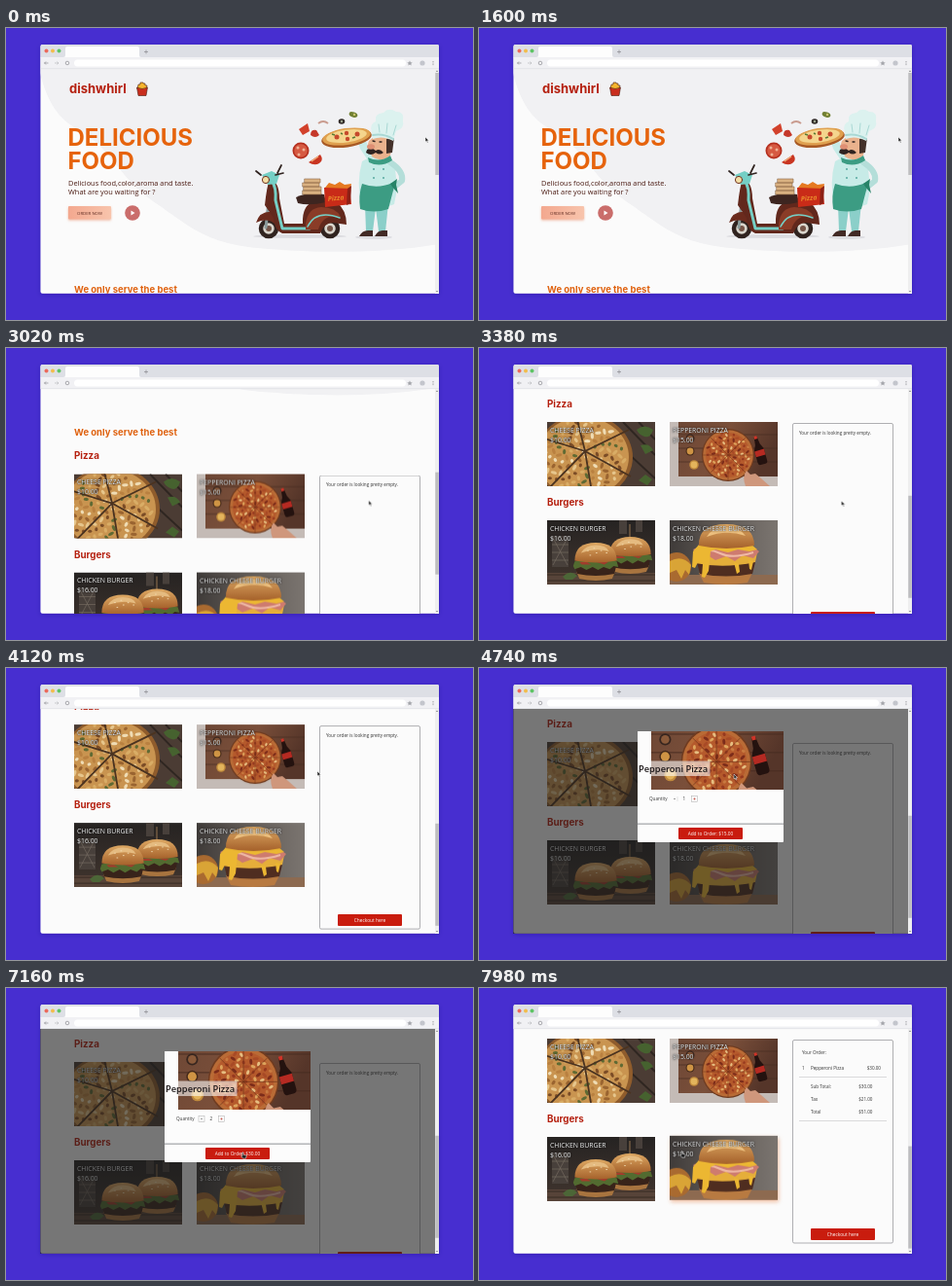
Write an HTML page that moves like this. It is 480x300 px and loops after 8000 ms.

```html
<!DOCTYPE html>
<html lang="en">
<head>
<meta charset="utf-8">
<title>Food order</title>
<style>
@property --scroll { syntax: "<number>"; inherits: true; initial-value: 0; }
html, body { margin: 0; width: 100%; height: 100%; overflow: hidden; background: #472ed0; }
svg.stage { display: block; width: 100vw; height: 100vh; animation: scroll 8s linear infinite; }
text { font-family: "Open Sans", sans-serif; }
.display, .display text { font-family: Inter, sans-serif; font-weight: 700; }
.page { transform: translateY(calc(var(--scroll) * -1px)); }
.thumb { transform: translateY(calc(var(--scroll) * .45px)); }
.name { font-size: 6.9px; fill: #fff; filter: drop-shadow(.5px .6px .5px #000) drop-shadow(0 0 1px #0009); }
.small { font-size: 4.6px; fill: #333; }
.label { font-size: 4.8px; fill: #fff; text-anchor: middle; }
.end { text-anchor: end; }

.cursor { animation: move 8s ease-in-out infinite; }
.arrow, .hand, .modal, .one, .two, .empty, .order { animation: 8s step-end infinite; }
.hand { animation-name: hand; }
.arrow { animation-name: arrow; }
.modal { animation-name: modal; }
.one { animation-name: one; }
.two { animation-name: two; }
.empty { animation-name: empty; }
.order { animation-name: order; }
.pick { animation: pick 8s linear infinite; }
.last { animation: last 8s linear infinite; }

@keyframes scroll {
  0%, 30.8% { --scroll: 0; }
  33% { --scroll: 58; }
  36% { --scroll: 138; }
  39% { --scroll: 212; }
  41.5%, 46% { --scroll: 235; }
  49%, 50.5% { --scroll: 259; }
  51.5% { --scroll: 253; }
  53.5%, 93.5% { --scroll: 235; }
  97.5%, 100% { --scroll: 259; }
}
@keyframes move {
  0%, 21% { transform: translate(431px, 112px); }
  29%, 33% { transform: translate(373px, 156px); }
  42%, 48% { transform: translate(372.5px, 157px); }
  51.5% { transform: translate(320px, 106px); }
  55%, 60% { transform: translate(262px, 109px); }
  69%, 77% { transform: translate(221px, 134px); }
  86%, 92% { transform: translate(243px, 169px); }
  97%, 100% { transform: translate(208px, 168px); }
}
@keyframes hand {
  0% { opacity: 0; } 53.5% { opacity: 1; } 57.25% { opacity: 0; }
  68% { opacity: 1; } 79% { opacity: 0; } 84% { opacity: 1; }
  91.25% { opacity: 0; } 95% { opacity: 1; }
}
@keyframes arrow {
  0% { opacity: 1; } 53.5% { opacity: 0; } 57.25% { opacity: 1; }
  68% { opacity: 0; } 79% { opacity: 1; } 84% { opacity: 0; }
  91.25% { opacity: 1; } 95% { opacity: 0; }
}
@keyframes modal { 0% { opacity: 0; } 57.25% { opacity: 1; } 91.25% { opacity: 0; } }
@keyframes one { 0% { opacity: 1; } 73.75% { opacity: 0; } }
@keyframes two { 0% { opacity: 0; } 73.75% { opacity: 1; } }
@keyframes empty { 0% { opacity: 1; } 91.25% { opacity: 0; } }
@keyframes order { 0% { opacity: 0; } 91.25% { opacity: 1; } }
@keyframes pick {
  0%, 53% { transform: none; filter: none; }
  55%, 57% { transform: translateY(-1px); filter: drop-shadow(1px 2px 2px #e9946699); }
  58%, 100% { transform: none; filter: none; }
}
@keyframes last {
  0%, 95% { transform: none; filter: none; }
  97%, 100% { transform: translateY(-1.2px); filter: drop-shadow(1px 2px 2px #e9946699); }
}
</style>
</head>
<body>
<svg class="stage" viewBox="0 0 480 300" preserveAspectRatio="none">
<defs>
  <clipPath id="view"><rect x="35.500" y="42" width="409.500" height="230.700"/></clipPath>
  <filter id="shade" x="-10%" y="-10%" width="120%" height="125%">
    <feDropShadow dx="0" dy="1" stdDeviation="2" flood-color="#1d0c7c" flood-opacity=".35"/>
  </filter>
  <filter id="soft" x="-20%" y="-40%" width="140%" height="200%">
    <feDropShadow dx="0" dy="1.2" stdDeviation="1.3" flood-color="#e47a50" flood-opacity=".5"/>
  </filter>
  <linearGradient id="peach"><stop stop-color="#f3a88f"/><stop offset="1" stop-color="#f8c4ac"/></linearGradient>
  <linearGradient id="night" x2="0" y2="1"><stop stop-color="#262322"/><stop offset="1" stop-color="#41352e"/></linearGradient>
  <linearGradient id="wood" x2="1" y2=".3"><stop stop-color="#6d4735"/><stop offset=".5" stop-color="#7a4f3a"/><stop offset="1" stop-color="#553529"/></linearGradient>
  <linearGradient id="wall"><stop stop-color="#3f3b39"/><stop offset=".35" stop-color="#59534f"/><stop offset="1" stop-color="#7b7570"/></linearGradient>
  <linearGradient id="bun" x2="0" y2="1"><stop stop-color="#dda863"/><stop offset="1" stop-color="#a5612b"/></linearGradient>

  <symbol id="cheese" viewBox="0 0 111 66">
    <rect width="111" height="66" fill="#4b3c34"/>
    <path d="M78 0L111 34M94 0L111 18M70 20L111 58" stroke="#2f2621" stroke-width="2"/>
    <ellipse cx="38" cy="36" rx="50" ry="44" fill="#8f5c2c"/>
    <ellipse cx="37" cy="36" rx="47" ry="41" fill="#c99450"/>
    <g id="bits"></g>
    <path d="M39 30L-6 16M39 30L30 -6M39 30L84 8M39 30L86 56M39 30L46 72M39 30L2 68" stroke="#4b3320" stroke-width="1.800"/>
    <path d="M92 8q8-7 17 0q-3 9-9 7t-8-7M96 24q9-3 13 5l-8 4zM94 60l7-6 7 5-5 6z" fill="#46622f"/>
  </symbol>

  <symbol id="pepperoni" viewBox="0 0 111 66">
    <rect width="111" height="66" fill="#c4bbb6"/>
    <path d="M9 0H111V56H9z" fill="url(#wood)"/>
    <path d="M9 13H111M9 27H111M9 41H111" stroke="#472c21" stroke-width=".7"/>
    <circle cx="21" cy="17" r="4.500" fill="#38261f"/><circle cx="21" cy="17" r="3.200" fill="#8a5a3a"/>
    <circle cx="21" cy="30" r="4.500" fill="#44291a"/><circle cx="21" cy="30" r="3.400" fill="#cf9444"/>
    <circle cx="25" cy="44" r="4.800" fill="#c08a3c"/><circle cx="25" cy="44" r="3.400" fill="#e3b45c"/>
    <circle cx="60" cy="34" r="27" fill="#6f3b20"/>
    <circle cx="60" cy="34" r="25.800" fill="#b96b36"/>
    <circle cx="60" cy="34" r="23" fill="#b55a2c"/>
    <g id="toppings"></g>
    <path d="M60 8V60M34 34H86M42 16L78 52M78 16L42 52" stroke="#6e3218" stroke-width=".5"/>
    <g transform="rotate(-16 92 29)">
      <path d="M90.500 15h3l1 8 2.500 5v13q0 3-2.500 3h-5q-2.500 0-2.500-3V28l2.500-5z" fill="#24120f"/>
      <path d="M87 29h10v6H87z" fill="#b52a22"/><path d="M90.500 14h3v3h-3z" fill="#cf3428"/>
    </g>
    <path d="M78 66q-4-10 1-16l4 4 5-1 6 5 9 8z" fill="#cf977c"/>
  </symbol>

  <symbol id="burger" viewBox="0 0 60 52">
    <path d="M5 40h50l-4 9q-21 5-42 0z" fill="#a8743f"/>
    <path d="M4 34q26-5 52 0l-2 9q-24 5-48 0z" fill="#38231a"/>
    <path d="M3 27q27-7 54 0l2 7-6-1-5 4-8-3-7 4-7-4-8 4-7-4-8 3-2-4z" fill="#526b30"/>
    <path d="M9 28h10l5 3H12zM31 28h15l-5 3z" fill="#a23c2c"/>
    <path d="M3 26Q3 3 30 3t27 23q-27 5-54 0z" fill="url(#bun)"/>
    <path d="M11 16Q17 6 30 6t17 8Q30 9 11 16z" fill="#e5bb80"/>
    <path d="M19 13h2m6-3h2m7 3h2m5 3h2M30 16h2m-10 3h2" stroke="#f3dcb4" stroke-width="1.100"/>
  </symbol>

  <symbol id="chicken" viewBox="0 0 111 66">
    <rect width="111" height="66" fill="url(#night)"/>
    <path d="M5 16h17v32H5zM74 0h8v14h-8zM91 0h7v12h-7z" fill="#48403b"/>
    <path d="M6 18L21 46M21 18L6 46M5 25h17m-17 8h17m-17 8h17" stroke="#756a61" stroke-width=".7"/>
    <rect y="54" width="111" height="12" fill="#574439"/>
    <path d="M0 56H111M0 62H111" stroke="#372a23"/>
    <path d="M85 4v14" stroke="#b38c5e" stroke-width=".8"/>
    <use href="#burger" x="62" y="13" width="47" height="44"/>
    <use href="#burger" x="26" y="20" width="48" height="43"/>
    <path d="M16 58q8-8 15-1l-5 4H19z" fill="#4c6637"/>
  </symbol>

  <symbol id="melted" viewBox="0 0 111 66">
    <rect width="111" height="66" fill="url(#wall)"/>
    <path d="M0 56H111V66H0z" fill="#8d6a50"/>
    <circle cx="7" cy="48" r="15" fill="#a96a30"/>
    <path d="M0 42q13-7 22 4l-2 10-4-5-4 9-5-9-7 3z" fill="#d9a436"/>
    <path d="M30 54h55l-5 10q-22 4-45 0z" fill="#b87a41"/>
    <path d="M28 43q30-5 60 0l-3 12q-27 5-54 0z" fill="#4f2d20"/>
    <path d="M26 33q32-9 64 0l-2 10q-32 7-62 1z" fill="#e5ae3a"/>
    <path d="M24 30q10-6 24-2l20-1q16-2 24 5l-6 7-11-3-8 6-9-5-11 4-8-5-9 1z" fill="#ce7b6f"/>
    <path d="M28 33q12-5 24 1t34-1" fill="none" stroke="#efb9a6" stroke-width="2"/>
    <path d="M30 25h54l6 5-8 2-12-2-10 3-13-3-5 2-2 20-4 7-3-1 1-13-5-2-3 6-3-1 1-16z" fill="#ecb732"/>
    <path d="M66 43l5 2 1 8-3 2zM81 41l5 1-2 9-2-1z" fill="#ecb732"/>
    <path d="M30 26Q29 4 58 4t29 22q-29 6-57 0z" fill="url(#bun)"/>
    <path d="M38 17Q44 7 58 7t20 9Q58 9 38 17z" fill="#edc07f"/>
  </symbol>
</defs>

<rect width="480" height="300" fill="#472ed0"/>
<rect x="35.500" y="17" width="409.500" height="255.700" rx="2" fill="#fbfbfb" filter="url(#shade)"/>

<g clip-path="url(#view)">
  <g class="page">
    <path d="M35 42H445V222C385 232 320 231 270 227C205 223 190 204 151 178C112 150 112 126 72 103C55 94 42 76 35 46z" fill="#f1f1f3"/>
    <text class="display" x="65" y="67.3" font-size="13" fill="#b5200f">dishwhirl</text>
    <g stroke="#4a1c10" stroke-width=".6">
      <path d="M135 63l1-5h2l0-2h3v1h2v2h2l-1 5z" fill="#f5b52e"/>
      <path d="M134.5 61q5.500 3 11 0l-1.500 8.500h-8z" fill="#c92e1d"/>
    </g>
    <g class="display" font-size="24" fill="#e6630c">
      <text x="63.500" y="121">DELICIOUS</text><text x="63.500" y="145">FOOD</text>
    </g>
    <g font-size="7.4" fill="#4a1a12">
      <text x="64" y="161.500">Delicious food,color,aroma and taste.</text>
      <text x="64" y="171">What are you waiting for ?</text>
    </g>
    <rect x="64" y="183" width="44" height="13.500" rx="1" fill="url(#peach)" filter="url(#soft)"/>
    <text x="86" y="191.500" font-size="4.300" text-anchor="middle" fill="#5d2a20">ORDER NOW</text>
    <circle cx="130" cy="190" r="7.800" fill="#ca6d6b"/>
    <path d="M128.500 187.500l4 2.500-4 2.500z" fill="#fff"/>

    <g id="scooter" stroke-linejoin="round" stroke-linecap="round">
      <ellipse cx="302" cy="214" rx="48" ry="2" fill="#dcdce0"/>
      <g fill="#d9d5cc" stroke="#30231f" stroke-width="4.500">
        <circle cx="270" cy="206" r="8"/><circle cx="333" cy="206" r="8"/>
      </g>
      <g fill="#765548"><circle cx="270" cy="206" r="3"/><circle cx="333" cy="206" r="3"/></g>
      <path d="M273 152l-6 53" stroke="#8a9a9a" stroke-width="3"/>
      <path d="M257 200q4-13 18-11l8 12-5 2q-8-9-21-3z" fill="#6b2b1d"/>
      <path d="M271 155q10 3 10 20l5 26h19q-1-20 13-23l22 1q10 8 10 23l-14-2q-9 0-13 11h-39q-8-3-9-16l-9-13q2-19 5-27z" fill="#62281c"/>
      <path d="M273 157q5 6 4 20l7 29h28" fill="none" stroke="#75cfc5" stroke-width="3"/>
      <path d="M308 201q2-16 16-17 15 0 20 10-18-4-23 13h-13z" fill="#8a3c27"/>
      <path d="M310 204q9-18 33-9" fill="none" stroke="#75cfc5" stroke-width="1.600"/>
      <path d="M298 174q12-6 29-3l2 8q-17 4-29 1z" fill="#3d2520"/>
      <path d="M263 151l10-4 8 4-3 9-9 1z" fill="#75cfc5"/>
      <path d="M262 151l-5-4m20 4l8-2M279 149l4-8" fill="none" stroke="#30231f" stroke-width="1.700"/>
      <circle cx="267" cy="156" r="3.600" fill="#f4dfa7" stroke="#713320"/>
      <g fill="#d9b181" stroke="#8a6544" stroke-width=".6">
        <path d="M305 167h19v4h-19zM306 163h18v4h-18zM305 159h17v4h-17zM307 155h16v4h-16z"/>
      </g>
      <path d="M327 164l26-1 2 18-27 3z" fill="#c92b18"/>
      <path d="M328 164l4-5 6 2 5-3 5 3 7-1-1 5z" fill="#e57921"/>
      <path d="M351 165l4-3-1 18-4 2z" fill="#8d2015"/>
      <text transform="translate(331 178) rotate(-6)" font-size="7" font-weight="700" font-style="italic" fill="#e98a2c">Pizza</text>
    </g>

    <g id="chef" stroke-linecap="round" stroke-linejoin="round">
      <ellipse cx="378" cy="215" rx="19" ry="1.700" fill="#dcdce0"/>
      <path d="M369 181l1 28h7l3-24 3 24h7l3-29z" fill="#8bcfc9"/>
      <path d="M363 214q3-6 9-6h5v6zM379 214q3-6 8-6h5v6z" fill="#422a25"/>
      <path d="M366 137q14-9 31-1 8 22 2 45-18 8-34 0-5-23 1-44z" fill="#c7ebe7"/>
      <path d="M372 136l-8-12-3-10 7-2 5 11 8 10z" fill="#c7ebe7"/>
      <path d="M358 113q4-5 9-3l2 5-8 2z" fill="#eab28d"/>
      <path d="M395 138q14 9 12 19l-10 8" fill="none" stroke="#b4ded9" stroke-width="6"/>
      <path d="M366 160q16 6 31-1l2 4-6 23q-15 5-29 0-2-14 2-26z" fill="#3c9c83"/>
      <path d="M395 160l7-5-1 6 2 9-6-7z" fill="#268367"/>
      <path d="M372 119q2-8 15-8l10 3-2 17q-10 8-19 1z" fill="#eab28d"/>
      <path d="M391 114l8-2-2 16-6 1z" fill="#433029"/>
      <path d="M371 125q5-3 9 1 4-3 8 2-4 3-8 0-5 4-10 0" fill="#302320"/>
      <ellipse cx="375" cy="122" rx="4" ry="2.800" fill="#df8f74"/>
      <path d="M377 116l2 .5M384 117h2" stroke="#302320" stroke-width="1.300"/>
      <path d="M372 133q12 6 23-2l2 5q-12 8-24 2z" fill="#3c9c83"/>
      <path d="M376 107q-3-8 4-11-2-8 8-9 5-6 13-1 9 0 7 9 2 8-7 11l-3 10q-11-6-21-2z" fill="#dcf2ef"/>
      <path d="M384 107l-1-8m8 9l1-10m6 12l3-10" fill="none" stroke="#a9d8d4"/>
      <path d="M377 110q11-2 21 4" fill="none" stroke="#a9d8d4" stroke-width="2"/>
      <g fill="#57a99f"><circle cx="378" cy="145" r="1"/><circle cx="378" cy="154" r="1"/><circle cx="388" cy="145" r="1"/><circle cx="388" cy="154" r="1"/></g>
    </g>

    <g id="flying">
      <ellipse cx="350" cy="113" rx="26" ry="9.500" transform="rotate(-8 350 113)" fill="#a85a25"/>
      <ellipse cx="350" cy="111.500" rx="25" ry="8.500" transform="rotate(-8 350 111.500)" fill="#dfa04f"/>
      <ellipse cx="350" cy="111" rx="21" ry="6.500" transform="rotate(-8 350 111)" fill="#f4d58d"/>
      <g fill="#c64a2c"><circle cx="340" cy="112" r="2.500"/><circle cx="350" cy="108" r="2.200"/><circle cx="361" cy="109" r="2.500"/><circle cx="351" cy="114" r="2.200"/></g>
      <path d="M335 109l3 1m6-2l2 1m10 4l3-1" stroke="#5a7b35" stroke-width="1.600"/>
      <circle cx="303" cy="126" r="8.500" fill="#b5301f"/><circle cx="303" cy="126" r="6.800" fill="#d65a42"/>
      <g fill="#efb195"><circle cx="300" cy="123" r="1.500"/><circle cx="306" cy="125" r="1.500"/><circle cx="301" cy="130" r="1.500"/></g>
      <path d="M311 138l12-8q4 6-1 9t-11-1z" fill="#c93521"/><path d="M314 137l7-5" stroke="#f0ad78" stroke-width="1.500"/>
      <path d="M301 104l9-6 2 8-7 4z" fill="#d2412b"/><path d="M313 110q0-6 6-5l3 5q-4 4-9 0z" fill="#c5382a"/>
      <path d="M321 98q5-4 10 0" fill="none" stroke="#c99b8e" stroke-width="2"/>
      <ellipse cx="345" cy="96" rx="3.300" ry="2.800" fill="#322c29"/><circle cx="345" cy="96" r="1.200" fill="#99a08c"/>
      <ellipse cx="357" cy="89" rx="4.500" ry="2.600" transform="rotate(20 357 89)" fill="#718034"/><circle cx="358" cy="89" r="1.200" fill="#c9c46c"/>
    </g>

    <g class="display">
      <text x="70" y="271.500" font-size="9.500" fill="#df610e">We only serve the best</text>
      <text x="70" y="295.800" font-size="9.800" fill="#b5200f">Pizza</text>
      <text x="70" y="397.300" font-size="9.800" fill="#b5200f">Burgers</text>
    </g>
    <g id="cards"></g>

    <rect x="322.500" y="312.500" width="103" height="208.500" rx="1.500" fill="#fbfbfb" stroke="#8f8f93" stroke-width=".7"/>
    <text class="small empty" x="329" y="323.700">Your order is looking pretty empty.</text>
    <g class="small order">
      <text x="332" y="326.700">Your Order:</text>
      <text x="332" y="342.700">1</text><text x="341" y="342.700">Pepperoni Pizza</text><text class="end" x="413" y="342.700">$30.00</text>
      <text x="341" y="361.700">Sub Total:</text><text class="end" x="404.500" y="361.700">$30.00</text>
      <text x="341" y="374.700">Tax</text><text class="end" x="404.500" y="374.700">$21.00</text>
      <text x="341" y="387.700">Total</text><text class="end" x="404.500" y="387.700">$51.00</text>
      <path d="M329 350.500h90M329 395.500h90" stroke="#c5c5c8" stroke-width=".6"/>
    </g>
    <rect x="341" y="506" width="66" height="12" rx="1" fill="#c91c0e"/>
    <text class="label" x="374" y="513.700">Checkout here</text>
  </g>

  <g class="modal">
    <rect x="35" y="42" width="406" height="231" fill="#1e1e1e" opacity=".6"/>
    <rect x="163" y="65" width="150" height="114" rx="1" fill="#fcfcfc"/>
    <svg x="163" y="65" width="150" height="60" viewBox="0 0 150 60" overflow="hidden">
      <use href="#pepperoni" y="-14.600" width="150" height="89.200"/>
      <rect width="14" height="60" fill="#fcfcfc"/>
    </svg>
    <rect x="163" y="95.500" width="74.500" height="15.500" fill="#fff" opacity=".58"/>
    <text x="164" y="107" font-size="9.300" font-weight="600" fill="#1c1718">Pepperoni Pizza</text>
    <text class="small" x="175" y="136">Quantity</text>
    <g fill="none" stroke="#aaa" stroke-width=".5">
      <rect x="218.500" y="131.500" width="6" height="6"/>
      <rect class="two" x="198" y="131.500" width="6" height="6"/>
    </g>
    <path d="M220.300 134.500h2.400m-1.200-1.200v2.400" stroke="#b3281b" stroke-width=".5"/>
    <path d="M200 134.500h2" stroke="#777" stroke-width=".7"/>
    <path class="one" d="M204 132v5" stroke="#ccc" stroke-width=".5"/>
    <text class="small one" x="209.500" y="136.200">1</text><text class="small two" x="209.500" y="136.200">2</text>
    <path d="M163 159h150v2H163z" fill="#d4d6d8"/><path d="M163 160.500h150" stroke="#a9abad" stroke-width=".7"/>
    <rect x="205" y="164" width="66" height="12" rx="1" fill="#c91c0e"/>
    <text class="label one" x="238" y="171.700">Add to Order: $15.00</text>
    <text class="label two" x="238" y="171.700">Add to Order: $30.00</text>
  </g>

  <rect x="441" y="42" width="4" height="231" fill="#eeeeef"/>
  <rect class="thumb" x="441.300" y="46" width="3.500" height="105" fill="#bdbdbf"/>
  <path d="M442 45l1-1.500 1 1.500zM442 270l1 1.500 1-1.500z" fill="#777"/>
</g>

<g id="chrome">
  <path d="M35.500 30.500V19q0-2 2-2h405.500q2 0 2 2v11.500z" fill="#dddfe5"/>
  <rect x="35.500" y="30" width="409.500" height="12" fill="#f1f1f4"/>
  <path d="M35.500 41.700h409.500" stroke="#d9dade" stroke-width=".6"/>
  <path d="M59 30q2 0 2-2v-7q0-2 2-2h72q2 0 2 2v7q0 2 2 2z" fill="#fdfdfd"/>
  <circle cx="41.500" cy="23.500" r="2" fill="#ec6a5c"/><circle cx="48" cy="23.500" r="2" fill="#f2bd4c"/><circle cx="54.500" cy="23.500" r="2" fill="#5ec466"/>
  <rect x="70" y="32.500" width="341" height="7" rx="3.500" fill="#fff"/>
  <g fill="none" stroke="#8b8c91" stroke-width=".7">
    <path d="M142 24.500h4m-2-2v4M43.500 36h-4l1.500-1.500m-1.500 1.500l1.500 1.500"/>
    <path d="M50 36h4l-1.500-1.500m1.500 1.500l-1.500 1.500" stroke="#b9babe"/>
    <circle cx="63" cy="36" r="1.800"/>
  </g>
  <path d="M415 33.500l.8 1.700 1.900.2-1.400 1.300.4 1.900-1.700-1-1.700 1 .4-1.900-1.400-1.300 1.900-.2z" fill="#a4a5aa"/>
  <circle cx="428" cy="36" r="2.600" fill="#c3c5cc"/>
  <path d="M439 34v.7m0 1v.7m0 1v.7" stroke="#77787d"/>
</g>

<g class="cursor" stroke="#fff" stroke-width=".5">
  <path class="arrow" d="M0 0v5l1.200-1 .9 2 .9-.4-.9-1.900h1.600z" fill="#222"/>
  <path class="hand" d="M-.2 0q.6-.7 1.200 0v2.200l2.600.6q.6.300.4 1.200l-.5 2.200H.6L-1.400 3.800q.2-1 1.200-.2z" fill="#222"/>
</g>
</svg>
<script>
const $ = id => document.getElementById(id);

const menu = [
  ["cheese", 70, 311, "CHEESE PIZZA", "$10.00", ""],
  ["pepperoni", 196, 311, "PEPPERONI PIZZA", "$15.00", "pick"],
  ["chicken", 70, 412, "CHICKEN BURGER", "$16.00", ""],
  ["melted", 196, 412, "CHICKEN CHEESE BURGER", "$18.00", "last"]
];
$("cards").innerHTML = menu.map(([photo, x, y, name, price, hover]) => `
  <g class="${hover}">
    <use href="#${photo}" x="${x}" y="${y}" width="111" height="66"/>
    <text class="name" x="${x + 3}" y="${y + 10.5}">${name}</text>
    <text class="name" x="${x + 3}" y="${y + 20.5}">${price}</text>
  </g>`).join("");

// Even, organic scatter by the golden angle
function scatter(id, count, cx, cy, rx, ry, size, colors) {
  let dots = "";
  for (let i = 0; i < count; i++) {
    const reach = Math.sqrt((i + .5) / count), turn = i * 2.4;
    const x = cx + rx * reach * Math.cos(turn), y = cy + ry * reach * Math.sin(turn);
    dots += `<ellipse rx="${size * (1 + i % 3 * .3)}" ry="${size * .8}" fill="${colors[i % colors.length]}"
      transform="translate(${x} ${y}) rotate(${i * 47})"/>`;
  }
  $(id).innerHTML = dots;
}
scatter("bits", 120, 37, 36, 44, 38, 2, ["#e6c68c", "#9a6430", "#efdcb4", "#b98040", "#5f6a33", "#d9ad66", "#7b4c26"]);
scatter("toppings", 85, 60, 34, 22.5, 22.5, 1.4, ["#96391f", "#dda45c", "#7c2c1a", "#c87a40", "#e6bd80", "#a84a26"]);
</script>
</body>
</html>
```
